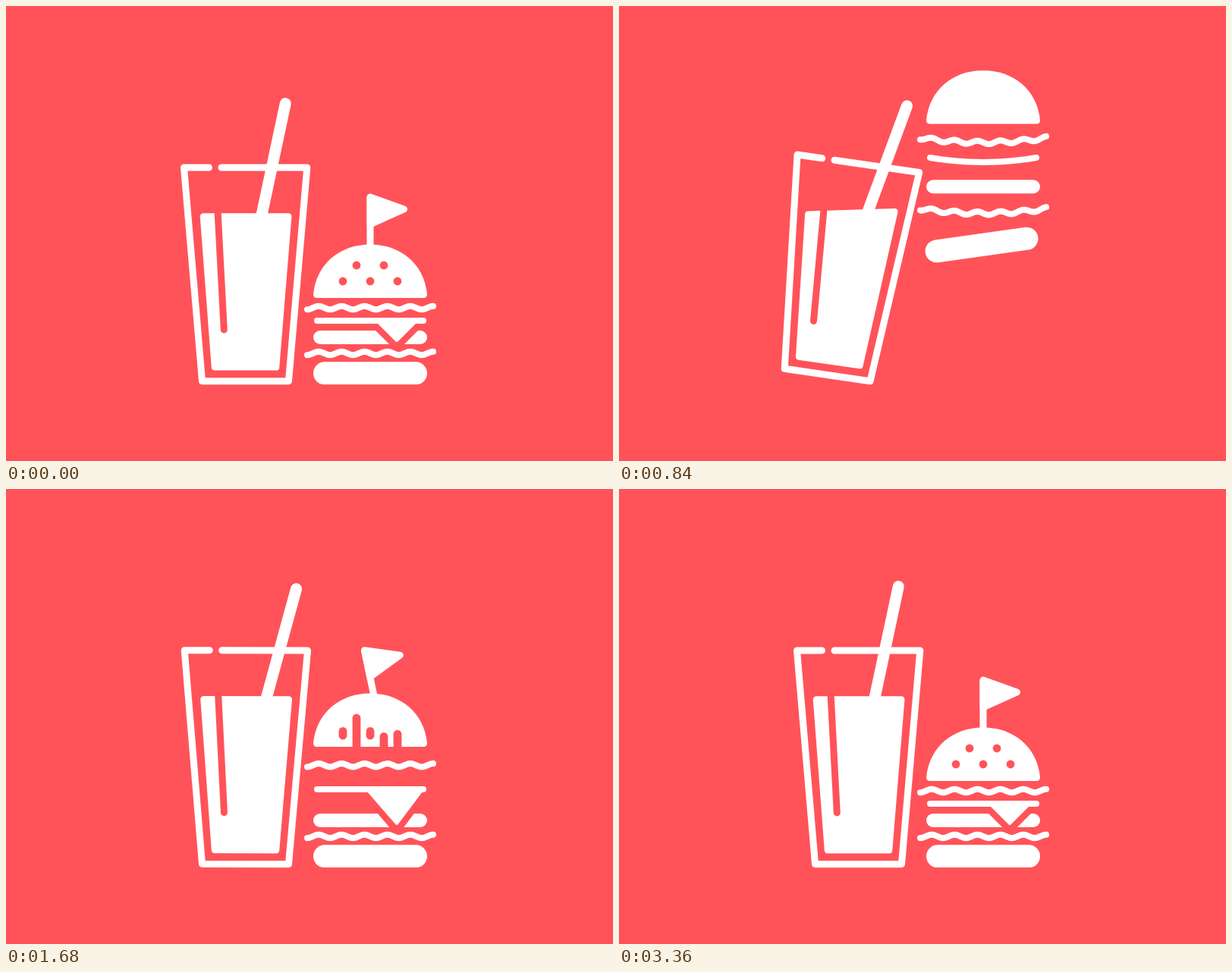
Animation, 800 px wide and 600 px high, one loop 3400 ms. Source, as an HTML page with a canvas:

```html
<!DOCTYPE html>
<html lang="en">
<head>
<meta charset="utf-8">
<title>Drink and burger</title>
<style>
html, body { margin: 0; width: 100%; height: 100%; overflow: hidden; background: #ff5359; }
canvas { display: block; }
</style>
</head>
<body>
<canvas id="stage" width="800" height="600"></canvas>
<script>
const ctx = document.getElementById('stage').getContext('2d');
const LOOP = 3400, ENTER = 400, APEX = 922, DROP = 1080, LAND = 1400, REST = 1860;
const GROUND = 499.3;
const RED = '#ff5359', WHITE = '#fff';
const { PI, sin, cos, exp } = Math;

// Progress from 0 to 1 between two times.
const ramp = (t, from, to) => Math.min(1, Math.max(0, (t - from) / (to - from)));
const mix = (a, b, u) => a + (b - a) * u;

// One full sine cycle whose amplitude grows with its progress.
function wave(t, from, to, amp, growth) {
  const x = ramp(t, from, to);
  return (amp + growth * x) * sin(2 * PI * x);
}

function group(draw) {
  ctx.save();
  draw();
  ctx.restore();
}

function turn(x, y, deg) {
  ctx.translate(x, y);
  ctx.rotate(deg * PI / 180);
  ctx.translate(-x, -y);
}

function trace(points, close) {
  ctx.beginPath();
  points.forEach(p => ctx.lineTo(p[0], p[1]));
  if (close) ctx.closePath();
}

function line(points, width, color = WHITE) {
  trace(points, false);
  ctx.lineWidth = width;
  ctx.strokeStyle = color;
  ctx.stroke();
}

// Filled polygon with corners rounded by its own stroke.
function blob(points, width, color = WHITE) {
  trace(points, true);
  ctx.lineWidth = width;
  ctx.fillStyle = ctx.strokeStyle = color;
  ctx.fill();
  ctx.stroke();
}

function pill(y, h) {
  ctx.beginPath();
  ctx.roundRect(405, y - h / 2, 150, h, h / 2);
  ctx.fillStyle = WHITE;
  ctx.fill();
}

// A strip that can sag or arch, optionally rippled.
function strip(y, half, bend, ripple) {
  const points = [];
  for (let i = 0; i <= 88; i++) {
    const u = i / 44 - 1;
    points.push([480 + u * half,
      y + bend * (1 - u * u) + ripple * cos(i / 8 * PI)]);
  }
  line(points, 8);
}

// ---- drink ----

function drawGlass(t) {
  const dx = -433 * (1 - ramp(t, 560, 967)) ** 2;
  const brake = Math.max(0, t - 640) / 148;
  const lean = 23.7 * brake * exp(-brake);
  const slosh = wave(t, 680, 1680, 9, 19);
  const sway = -19 * exp(-(((t - 1360) / 240) ** 2)) * cos(PI * (t - 1360) / 340);

  ctx.translate(dx, 0);
  turn(372.5, 495, lean);

  blob([[260, 277.5 + 1.1 * slosh], [372.2, 277.5 - 0.85 * slosh],
    [356, 476.3], [275, 476.3]], 8.5);
  line([[277.7, 245], [287.3, 427]], 9, RED);
  line([[267.5, 213], [234.5, 213], [258.5, 494.7], [372.5, 494.7],
    [396.8, 213], [284, 213]], 9);

  group(() => {
    ctx.translate(Math.max(0, -sway / 2), 0);
    turn(316, 374, sway);
    line([[368.3, 128.5], [316, 374]], 15);
  });
}

// ---- burger ----

// Height of a layer resting at y: tossed up from y + depth, hanging at
// y - peak, falling, then bouncing more the higher it sits.
function layer(t, y, depth, peak) {
  if (t < APEX) return y - peak + (depth + peak) * ((APEX - t) / 482) ** 2;
  if (t < LAND) return y - peak * (1 - ramp(t, DROP, LAND) ** 2.23);
  const u = ramp(t, LAND, REST);
  return y - 0.91 * Math.max(0, 437 - y) * 4 * u * (1 - u);
}

function drawFlag(t) {
  if (t < 1480) return;
  const beat = (t - 1600) / 320;
  const amp = beat > 0 && beat < 5 ? 16.5 * exp(-1.4 * Math.max(0, beat - 2.5)) : 0;
  ctx.translate(0, 63 * (1 - ramp(t, 1480, 1830)) ** 3);
  turn(480, 289, -amp * sin(PI * beat));
  ctx.fillStyle = WHITE;
  ctx.fillRect(475.5, 252, 9, 68);
  blob([[480, 252], [524.5, 268], [480, 288]], 9);
}

function drawBun() {
  ctx.beginPath();
  ctx.moveTo(405, 380);
  ctx.bezierCurveTo(409, 340, 440, 314.5, 480, 314.5);
  ctx.bezierCurveTo(520, 314.5, 551, 340, 555, 380);
  ctx.quadraticCurveTo(555, 385, 550, 385);
  ctx.lineTo(410, 385);
  ctx.quadraticCurveTo(405, 385, 405, 380);
  ctx.fillStyle = WHITE;
  ctx.fill();
}

// Seeds shoot up from the bun's lower edge; the late ones stretch into streaks.
function drawSeeds(t) {
  [0, 26, 0, 108, 42].forEach((delay, i) => {
    const head = 1517 + delay, tail = delay ? 1670 : 1572;
    if (t <= head) return;
    const x = 444 + 18 * i, y = i % 2 ? 342 : 363;
    const at = from => mix(y, 407, (1 - ramp(t, from, from + 240)) ** 3);
    line([[x, at(head)], [x, at(tail) + 0.01]], 10.8, RED);
  });
}

function drawBurger(t) {
  const bunY = layer(t, 385, 135, 240);
  const leafY = layer(t, 398, 86, 233);
  const sliceY = layer(t, 415, 59, 223);
  const pattyY = layer(t, 437, 51, 206);
  const lowLeafY = layer(t, 458, 62, 198);
  const baseY = layer(t, 484.3, 62, 176);
  const bend = wave(t, 440, 1680, 4.1, 7.9);
  const softBend = bend < 0 ? bend * 0.65 : bend;
  const tilt = -8.1 * sin(PI * ramp(t, 440, 1340));

  // The cheese corner flips up in the fall, then sticks to the patty.
  const flop = ramp(t, LAND, 1520);
  const raised = 415 - sliceY;
  const tip = mix(-12.5 * ramp(t, DROP, 1360), 26 + raised, flop);
  const half = mix(30, 26 + 0.55 * raised, flop);
  const mid = 515 - 0.14 * raised * flop;
  const top = sliceY + softBend * 0.7;
  const cheese = [[mid - half, top], [515, top + tip], [mid + half, top]];

  ctx.beginPath();
  ctx.rect(-800, 0, 2400, GROUND);
  ctx.clip();

  group(() => {
    ctx.translate(0, bunY - 385);
    drawFlag(t);
  });
  pill(pattyY, 18);
  group(() => {
    ctx.translate(tilt / 4, 0);
    turn(480, baseY, tilt);
    pill(baseY, 30);
  });
  if (tip > 1) blob(cheese, 21, RED);
  strip(lowLeafY, 83, softBend, 2.2);
  strip(sliceY, 70, softBend, 0);
  if (tip) blob(cheese, 4);
  strip(leafY, 83, bend, 2.2);
  ctx.translate(0, bunY - 385);
  drawBun();
  drawSeeds(t);
}

function draw(t) {
  ctx.fillStyle = RED;
  ctx.fillRect(0, 0, 800, 600);
  ctx.lineCap = ctx.lineJoin = 'round';
  const leaving = t < ENTER;
  const pose = leaving ? LOOP : t;
  const slide = leaving ? 430 * (t / 360) ** 2.5 : 0;
  group(() => {
    ctx.translate(-slide, 0);
    drawGlass(pose);
  });
  group(() => {
    ctx.translate(slide, 0);
    drawBurger(pose);
  });
}

const began = performance.now();
function tick() {
  draw((performance.now() - began) % LOOP);
  requestAnimationFrame(tick);
}
tick();
</script>
</body>
</html>
```
